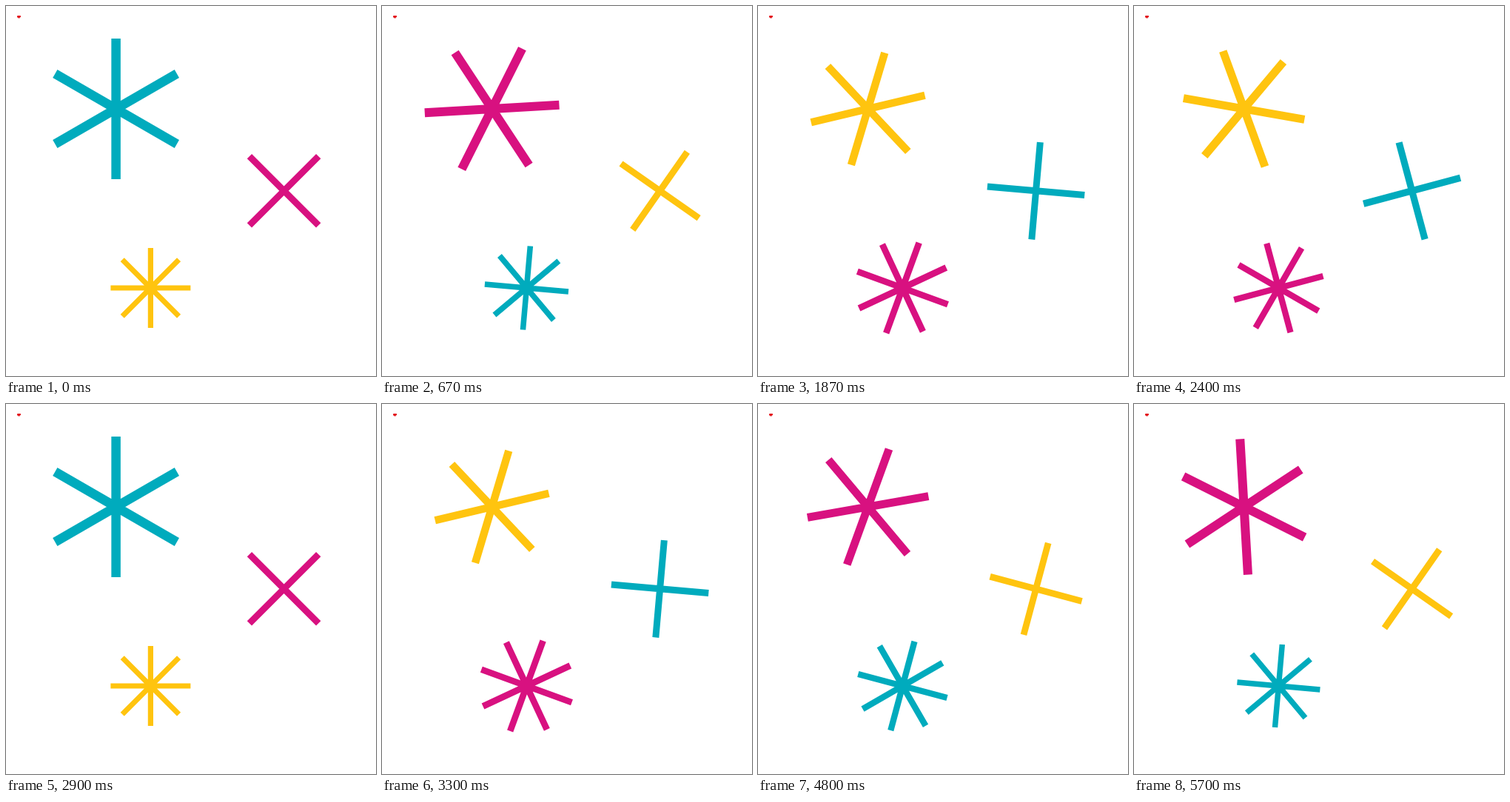
Write an HTML page that moves like this. It is 500x500 px and loops after 5730 ms.

```html
<!DOCTYPE html>
<html lang="en">
<head>
<meta charset="utf-8">
<title>Spinning stars</title>
<style>
  html, body { margin: 0; width: 100%; height: 100%; overflow: hidden; background: #fff; }
  svg { display: block; width: 100%; height: 100%; }
</style>
</head>
<body>
<svg id="stage" viewBox="0 0 500 500">
  <path fill="#e3131b" d="M15 13.6 16 13h3.4l.8.8-.4 1.2-1 .6-.4 1h-1.6l-.6-.8-1.2-.6z"/>
</svg>
<script>
const LOOP = 5730;
const CYCLE = 18;       // steps until every pose repeats
const COLOR_HOLD = 3;   // steps each colour stays
const COLORS = ['#00abbd', '#ffc40f', '#d81180'];

// spin: degrees per step; keys: [step, radius] joined by straight lines
const stars = [
  { x: 148.6, y: 139, bars: 3, r: 95, width: 12.5, start: 0, spin: 10 / 3, color: 0,
    keys: [[0, 95], [5, 79], [9, 95], [13, 79], [18, 95]] },
  { x: 375.6, y: 249.8, bars: 2, r: 66, width: 9, start: 45, spin: 10, color: 2,
    keys: [[-3, 62.4], [3, 69.5], [7, 62.4], [11, 69.5], [15, 62.4], [21, 69.5]] },
  { x: 195.4, y: 381, bars: 4, r: 54, width: 7.2, start: 0, spin: -5, color: 1,
    keys: [[0, 54], [5, 65], [9, 54], [13, 65], [18, 54]] }
];

const stage = document.getElementById('stage');

function makeStar(star) {
  const path = document.createElementNS('http://www.w3.org/2000/svg', 'path');
  let d = '';
  for (let i = 0; i < star.bars; i++) {
    const a = i * Math.PI / star.bars;
    const dx = star.r * Math.sin(a), dy = -star.r * Math.cos(a);
    d += `M${-dx} ${-dy}L${dx} ${dy}`;
  }
  path.setAttribute('d', d);
  path.setAttribute('stroke-width', star.width);
  star.path = stage.appendChild(path);
}

function valueAt(keys, step) {
  const i = keys.findIndex(key => key[0] > step);
  const [s0, v0] = keys[i - 1], [s1, v1] = keys[i];
  return v0 + (v1 - v0) * (step - s0) / (s1 - s0);
}

// Poses advance every 80 ms, shown on a 30 per second clock.
function stepAt(ms) {
  const tick = Math.floor((ms + 4) * 0.03);
  return Math.min(71, Math.floor(tick / 2.4 + 1e-6));
}

function render(ms) {
  const step = stepAt(ms % LOOP);
  const hue = Math.floor(step / COLOR_HOLD);
  for (const s of stars) {
    const scale = valueAt(s.keys, step % CYCLE) / s.r;
    const angle = s.start + s.spin * step;
    s.path.setAttribute('transform', `translate(${s.x} ${s.y}) rotate(${angle}) scale(${scale})`);
    s.path.setAttribute('stroke', COLORS[(hue + s.color) % COLORS.length]);
  }
}

stars.forEach(makeStar);
const begin = performance.now();
function loop() {
  render(performance.now() - begin);
  requestAnimationFrame(loop);
}
loop();
</script>
</body>
</html>
```
